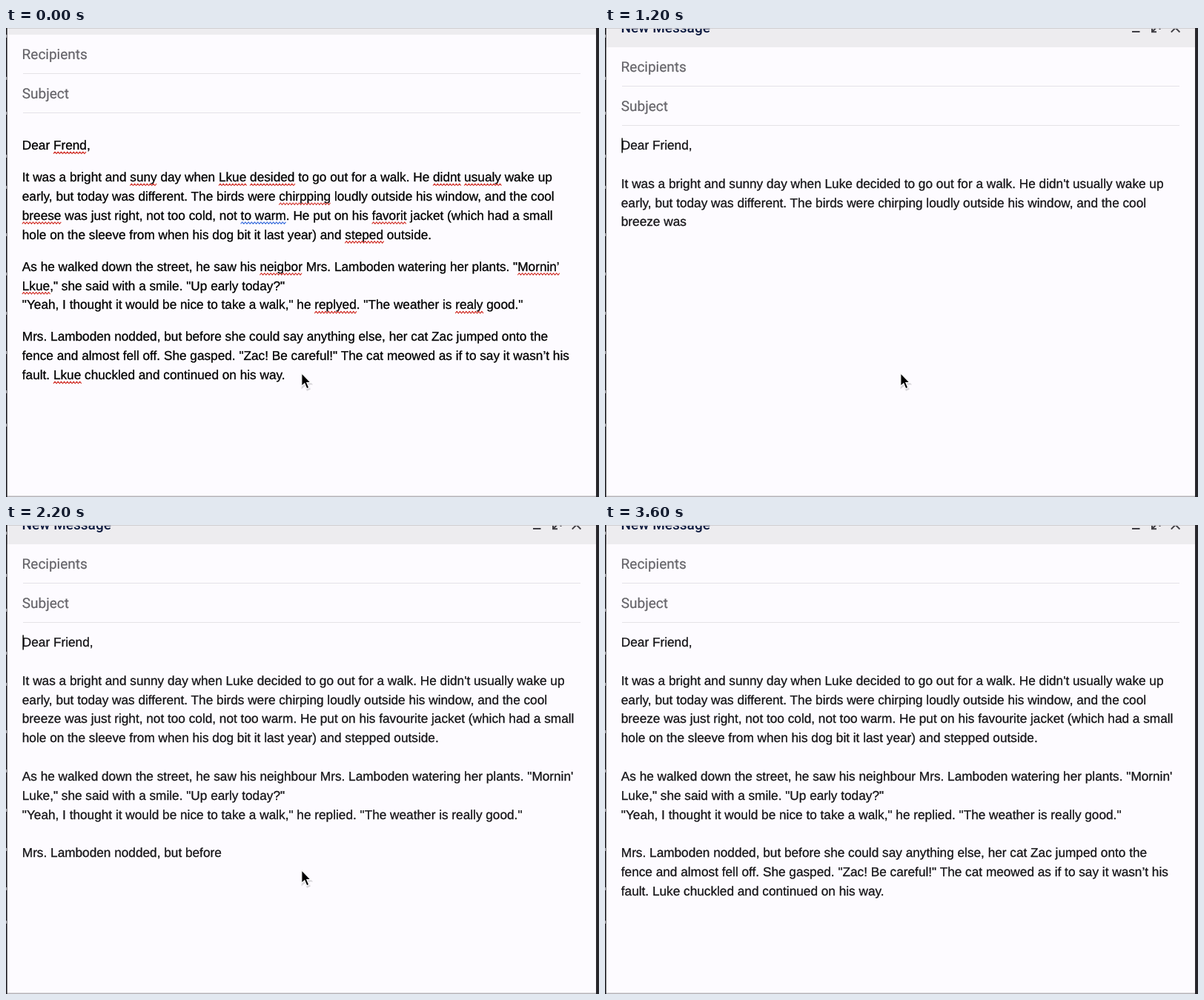
Recreate the animation shown at these times as an HTML page. Size 800x633 px, loop 3700 ms.

```html
<!DOCTYPE html>
<html lang="en">
<head>
<meta charset="utf-8">
<title>Letter correction</title>
<style>
  html, body { margin: 0; width: 100%; height: 100%; overflow: hidden; background: #fdfbff; }
  svg { display: block; width: 100vw; height: 100vh; }
  text { text-rendering: geometricPrecision; white-space: pre; }
  .body { font: 17.23px "Liberation Sans", Arial, sans-serif; }
  .body text { stroke: currentColor; stroke-width: .3; fill: currentColor; }
  .label { font: 19px Roboto, sans-serif; fill: #656469; stroke: #656469; stroke-width: .2; }
  .title { font: 500 19px Roboto, sans-serif; fill: #0c1a40; }
</style>
</head>
<body>
<svg id="stage" viewBox="0 0 800 633">
  <rect width="800" height="633" fill="#fdfbff"/>
  <g id="header">
    <rect y="-20" width="800" height="46" fill="#edecef"/>
    <text class="title" x="21.6" y="6">New Message</text>
    <g fill="none" stroke="#3f3e44" stroke-width="2">
      <path d="M711 5H721.5"/>
      <path d="M738 -1V5.2H744M738.5 4.7L748 -4.8M748.5 -1V2"/>
      <path d="M763.8 5.6L775.4 -6M775.4 5.6L763.8 -6"/>
    </g>
    <text class="label" x="21.6" y="59">Recipients</text>
    <text class="label" x="21.8" y="112">Subject</text>
    <path d="M23 78.5H775M23 131.5H775" stroke="#e4e2e7"/>
  </g>
  <g id="draft" class="body" color="#000"></g>
  <g id="fixed" class="body" color="#161518"></g>
  <rect id="caret" x="22.4" y="148.5" width="1.5" height="20" fill="#000"/>
  <g id="pointer" transform="translate(398.8 465.8)">
    <path d="M0 0V17.6L4 14L6.9 21L10 19.7L7.1 12.9H12.3Z" fill="#000" opacity=".14" transform="translate(.8 1.8)" stroke="#000" stroke-width="2"/>
    <path d="M0 0V17.6L4 14L6.9 21L10 19.7L7.1 12.9H12.3Z" fill="#000" stroke="#fff" stroke-width="1.2"/>
  </g>
  <path d="M0 .5H800" stroke="#cfced2"/>
  <path d="M0 632.3H800" stroke="#b5b4b8" stroke-width="1.4"/>
  <rect width="1.6" height="633" fill="#1b1a1f"/>
  <rect x="796" width="4" height="633" fill="#27262b"/>
  <g id="specks" fill="#a9a8ad"></g>
</svg>
<script>
const LOOP = 3700, SWITCH = 800, HIDE_POINTER = 2600;
const LEFT = 21.8, TOP = 164, LEADING = 25.85, GAP = 17.2;
const $ = id => document.getElementById(id);

// {word} is a spelling mistake, [words] a grammar one, an empty line a paragraph break
const draftText = `Dear {Frend},

It was a bright and {suny} day when {Lkue} {desided} to go out for a walk. He {didnt} {usualy} wake up
early, but today was different. The birds were {chirpping} loudly outside his window, and the cool
{breese} was just right, not too cold, not [to warm]. He put on his {favorit} jacket (which had a small
hole on the sleeve from when his dog bit it last year) and {steped} outside.

As he walked down the street, he saw his {neigbor} Mrs. Lamboden watering her plants. "{Mornin’}
{Lkue}," she said with a smile. "Up early today?"
"Yeah, I thought it would be nice to take a walk," he {replyed}. "The weather is {realy} good."

Mrs. Lamboden nodded, but before she could say anything else, her cat Zac jumped onto the
fence and almost fell off. She gasped. "Zac! Be careful!" The cat meowed as if to say it wasn’t his
fault. {Lkue} chuckled and continued on his way.`;

const fixedText = `Dear Friend,

It was a bright and sunny day when Luke decided to go out for a walk. He didn't usually wake up
early, but today was different. The birds were chirping loudly outside his window, and the cool
breeze was just right, not too cold, not too warm. He put on his favourite jacket (which had a small
hole on the sleeve from when his dog bit it last year) and stepped outside.

As he walked down the street, he saw his neighbour Mrs. Lamboden watering her plants. "Mornin'
Luke," she said with a smile. "Up early today?"
"Yeah, I thought it would be nice to take a walk," he replied. "The weather is really good."

Mrs. Lamboden nodded, but before she could say anything else, her cat Zac jumped onto the
fence and almost fell off. She gasped. "Zac! Be careful!" The cat meowed as if to say it wasn’t his
fault. Luke chuckled and continued on his way.`;

function add(parent, tag, attrs) {
  const el = document.createElementNS("http://www.w3.org/2000/svg", tag);
  for (const key in attrs) el.setAttribute(key, attrs[key]);
  return parent.appendChild(el);
}

function wave(x0, x1, y) {
  const step = 2.1, rise = 1.3;
  let d = `M${x0} ${y + rise}`;
  for (let x = x0 + step, up = true; x <= x1 + 1; x += step, up = !up) {
    d += `L${x} ${up ? y - rise : y + rise}`;
  }
  return d;
}

function underline(line, y, from, to, color) {
  const x0 = LEFT + (from ? line.getSubStringLength(0, from) : 0);
  const x1 = LEFT + line.getSubStringLength(0, to);
  add($("draft"), "path", {
    d: wave(x0, x1, y + 4.4), fill: "none", stroke: color,
    "stroke-width": 1.1, "stroke-linejoin": "round"
  });
}

function buildDraft() {
  let y = TOP;
  for (const source of draftText.split("\n")) {
    if (!source) { y += GAP; continue; }
    const marks = [];
    let plain = "", start = 0;
    for (const ch of source) {
      if (ch === "{" || ch === "[") start = plain.length;
      else if (ch === "}") marks.push([start, plain.length, "#d2342c"]);
      else if (ch === "]") marks.push([start, plain.length, "#3c6fdc"]);
      else plain += ch;
    }
    const line = add($("draft"), "text", { x: LEFT, y });
    line.textContent = plain;
    for (const [from, to, color] of marks) underline(line, y, from, to, color);
    y += LEADING;
  }
}

const fixedLines = [];
function buildFixed() {
  fixedText.split("\n").forEach((source, row) => {
    if (!source) return;
    const el = add($("fixed"), "text", { x: LEFT, y: TOP + row * LEADING });
    fixedLines.push({ el, words: source.split(" ") });
  });
}

// time and number of words typed so far
const pace = [[800, 6], [1200, 41], [1900, 98], [2400, 138], [2700, 161]];
function wordsAt(t) {
  for (let i = 1; i < pace.length; i++) {
    const [t0, n0] = pace[i - 1], [t1, n1] = pace[i];
    if (t <= t1) return Math.round(n0 + (n1 - n0) * (t - t0) / (t1 - t0));
  }
  return Infinity;
}

const show = (id, on) => $(id).setAttribute("visibility", on ? "visible" : "hidden");

function render(time) {
  const t = Math.floor(time % LOOP / 100) * 100;
  const typing = t >= SWITCH;
  show("draft", !typing);
  show("fixed", typing);
  show("pointer", t < HIDE_POINTER);
  show("caret", t >= 100 && Math.floor((t - 100) / 500) % 2 === 0);
  $("header").setAttribute("transform", `translate(0 ${typing ? 0 : -17})`);
  if (!typing) return;
  let left = wordsAt(t);
  for (const { el, words } of fixedLines) {
    const text = words.slice(0, Math.max(0, left)).join(" ");
    if (el.textContent !== text) el.textContent = text;
    left -= words.length;
  }
}

buildDraft();
buildFixed();
for (const y of [9, 66, 113, 171, 213, 277, 330, 383, 436, 489, 534])
  add($("specks"), "rect", { x: 0, y, width: 1.2, height: 4 });

const begin = performance.now();
function tick() {
  render(performance.now() - begin);
  requestAnimationFrame(tick);
}
tick();
</script>
</body>
</html>
```
